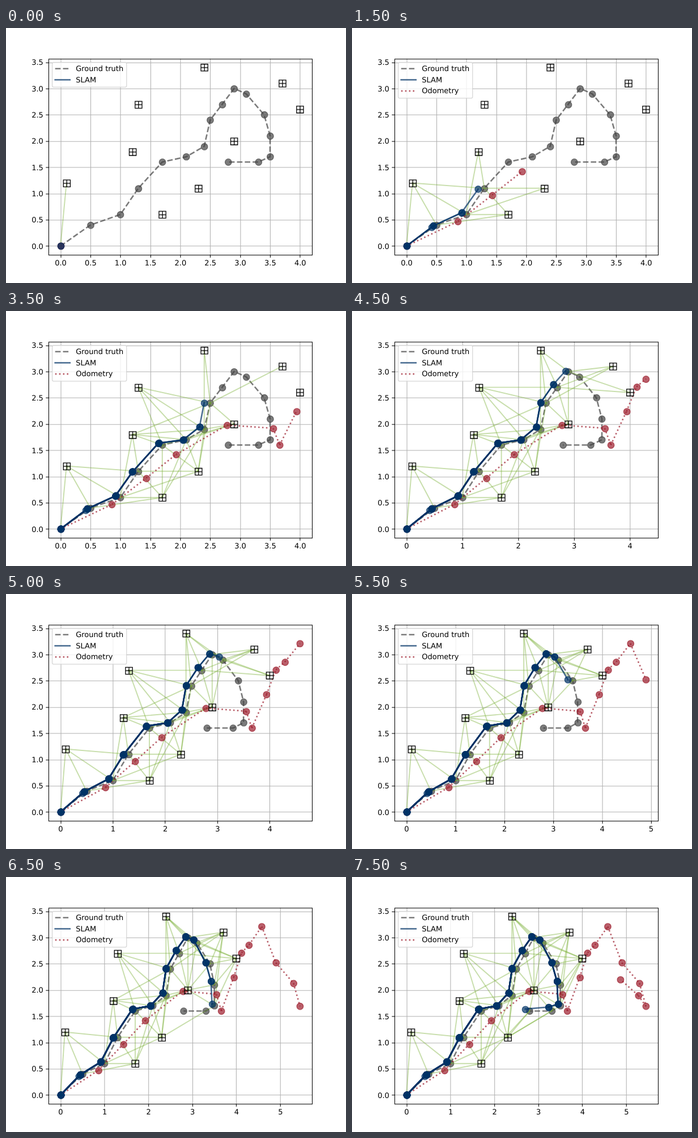
These frames come from a looping animation (600 by 450 pixels, 8000 ms). An HTML page:

```html
<!DOCTYPE html>
<html lang="en">
<head>
<meta charset="utf-8">
<title>SLAM path plot</title>
<style>
  html, body { margin: 0; width: 100%; height: 100%; overflow: hidden; background: #fff; }
  svg { display: block; width: 600px; height: 450px; }
  text { font: 13.89px "DejaVu Sans", Verdana, sans-serif; text-rendering: geometricPrecision; }
</style>
</head>
<body>
<svg id="plot" viewBox="0 0 640 480"></svg>
<script>
const STEP = 500, RANGE = 1.501;
const PT = 100 / 72;
const box = { l: 80, t: 57.6, r: 576, b: 427.2 };
const GRAY = '#444444', NAVY = '#003366', RED = '#9c1c2c', GREEN = '#77ac30';

// waypoints, landmarks and noisy odometry readings, in plot units
const truth = [[0, 0], [.5, .4], [1, .6], [1.3, 1.1], [1.7, 1.6], [2.1, 1.7], [2.4, 1.9], [2.5, 2.4],
  [2.7, 2.7], [2.9, 3], [3.1, 2.9], [3.4, 2.5], [3.5, 2.1], [3.5, 1.7], [3.3, 1.6], [2.8, 1.6]];
const marks = [[.1, 1.2], [1.7, .6], [1.2, 1.8], [2.3, 1.1], [1.3, 2.7], [2.9, 2], [2.4, 3.4], [3.7, 3.1], [4, 2.6]];
const odometry = [[0, 0], [.86, .47], [1.43, .97], [1.93, 1.42], [2.78, 1.98], [3.55, 1.92], [3.66, 1.6],
  [3.94, 2.24], [4.12, 2.71], [4.29, 2.86], [4.58, 3.21], [4.9, 2.52], [5.3, 2.13], [5.45, 1.69],
  [5.27, 1.9], [4.87, 2.2]];

// the estimate stays a little left of the truth and drifts slowly upwards
const slam = truth.map(([x, y], k) => k
  ? [x - .073 - .024 * Math.cos((k - 2.7) * 1.5), y + .004 * k + .02 * (-1) ** k]
  : [x, y]);
// a new pose is slightly off until the next step corrects it
function firstGuess([x, y], k) {
  const nudge = k ? .03 / k * (-1) ** k : 0;
  return [x + nudge, y + nudge];
}

const svg = document.getElementById('plot');
const snap = v => Math.round(v) + .5;

function el(tag, attrs) {
  const node = document.createElementNS('http://www.w3.org/2000/svg', tag);
  for (const key in attrs) node.setAttribute(key, attrs[key]);
  return svg.appendChild(node);
}
function line(points, color, width, alpha, style) {
  el('polyline', { points: points.map(p => p.join()).join(' '), fill: 'none', stroke: color,
    'stroke-width': width * PT, 'stroke-opacity': alpha, 'stroke-linejoin': 'round', ...style });
}
function dot([cx, cy], color) {
  el('circle', { cx, cy, r: 6.15, fill: color, 'fill-opacity': .7, stroke: color,
    'stroke-opacity': .7, 'stroke-width': PT });
}
function label(text, x, y, anchor = 'start') {
  el('text', { x, y, 'text-anchor': anchor }).textContent = text;
}
const dashed = { 'stroke-dasharray': [3.7 * 2 * PT, 1.6 * 2 * PT] };
const dotted = { 'stroke-dasharray': [2 * PT, 1.65 * 2 * PT] };
const solid = { 'stroke-linecap': 'square' };

function thin(x1, y1, x2, y2, color) {
  el('line', { x1, y1, x2, y2, stroke: color, 'stroke-width': .8 * PT });
}

function drawAxes(X, Y, max) {
  const gap = max > 4.05 ? 1 : .5;
  for (let v = 0; v <= max * 1.05; v += gap) {
    const x = snap(X(v));
    thin(x, box.t, x, box.b, '#b0b0b0');
    thin(x, box.b, x, box.b + 5, '#000');
    label(gap < 1 ? v.toFixed(1) : v, X(v) + .4, 447, 'middle');
  }
  for (let v = 0; v <= 3.5; v += .5) {
    const y = snap(Y(v));
    thin(box.l, y, box.r, y, '#b0b0b0');
    thin(box.l - 5, y, box.l, y, '#000');
    label(v.toFixed(1), 70.3, Y(v) + 5.1, 'end');
  }
}

function drawMark([x, y]) {
  el('path', { d: `M${x - 6.5} ${y - 6.5}h13v13h-13zM${x - 6.5} ${y}h13M${x} ${y - 6.5}v13`,
    fill: 'none', stroke: '#000', 'stroke-width': PT });
}

function drawLegend(step) {
  const rows = [['Ground truth', GRAY, dashed], ['SLAM', NAVY, solid], ['Odometry', RED, dotted]];
  if (!step) rows.pop();
  el('rect', { x: 87, y: 64.6, width: 140, height: 5.2 + rows.length * 20.8, rx: 2.8, fill: '#fff',
    'fill-opacity': .8, stroke: '#ccc', 'stroke-opacity': .8, 'stroke-width': PT });
  rows.forEach(([name, color, style], i) => {
    const y = 76.3 + i * 20.8;
    line([[92.5, snap(y)], [120.3, snap(y)]], color, 2, .7, style);
    label(name, 131.4, Math.round(y + 4.9));
  });
}

function draw(step) {
  svg.replaceChildren();
  const max = Math.max(4, ...odometry.slice(0, step + 1).map(p => p[0]));
  const w = box.r - box.l, h = box.b - box.t;
  const X = v => box.l + w / 22 + v / max * w / 1.1;
  const Y = v => box.b - h / 22 - v / 3.4 * h / 1.1;
  const at = p => [X(p[0]), Y(p[1])];
  const pin = p => at(p).map(snap);

  drawAxes(X, Y, max);
  line(truth.map(at), GRAY, 2, .7, dashed);
  truth.forEach(p => dot(pin(p), GRAY));

  for (let k = 0; k <= step; k++) {
    const [x, y] = truth[k];
    for (const m of marks) {
      if (Math.hypot(m[0] - x, m[1] - y) <= RANGE) line([at(truth[k]), at(m)], GREEN, 1.5, .4, solid);
    }
  }
  for (let k = 0; k <= step; k++) {
    if (k) line([at(odometry[k - 1]), at(odometry[k])], RED, 2, .7, dotted);
    dot(pin(odometry[k]), RED);
  }
  // every step lays the whole estimated path over the earlier ones
  for (let k = 0; k <= step; k++) {
    const path = [...slam.slice(0, k), firstGuess(slam[k], k)];
    if (k) line(path.map(at), NAVY, 2, .7, solid);
    path.forEach(p => dot(pin(p), NAVY));
  }
  marks.forEach(m => drawMark(pin(m)));
  const [x, y, r, b] = [box.l, box.t, box.r, box.b].map(snap);
  el('rect', { x, y, width: r - x, height: b - y, fill: 'none', stroke: '#000', 'stroke-width': .8 * PT });
  drawLegend(step);
}

let shown = 0;
draw(0);
const start = performance.now();
function tick() {
  const step = Math.floor(Math.max(0, performance.now() - start) / STEP) % truth.length;
  if (step !== shown) draw(shown = step);
  requestAnimationFrame(tick);
}
requestAnimationFrame(tick);
</script>
</body>
</html>
```
